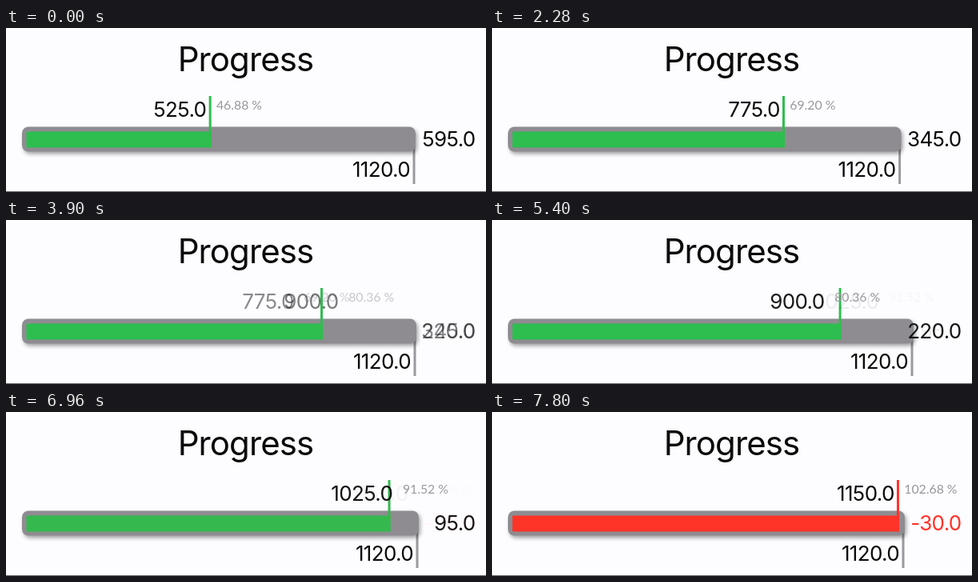
Write an HTML page that moves like this. It is 600x205 px and loops after 7.86 s.

```html
<!DOCTYPE html>
<html lang="en">
<head>
<meta charset="utf-8">
<title>Progress</title>
<style>
  html, body { margin: 0; width: 100%; height: 100%; overflow: hidden; background: #fdfcff; }
  svg { display: block; width: 600px; height: 205px; }
  text { font-family: Inter, "Liberation Sans", sans-serif; font-size: 26px; letter-spacing: -.65px; fill: #0a0a0a; }
  .title { font-size: 42px; letter-spacing: -.9px; text-anchor: middle; }
  .end { text-anchor: end; }
  .percent { font-family: Lato, sans-serif; font-size: 15.8px; letter-spacing: 0; fill: #98979c; }
  .track { fill: #8e8c91; filter: drop-shadow(2px 3px 2.5px rgba(0, 0, 0, .36)); }
  .limit { fill: #9a999d; }
</style>
</head>
<body>
<svg viewBox="0 0 600 205">
  <rect y="204" width="600" height="1" fill="#68676a"/>
  <text class="title" x="299.5" y="54">Progress</text>
  <rect id="limit" class="limit" y="140" width="3" height="55"/>
  <rect id="track" class="track" x="20" y="123.5" height="31" rx="8"/>
  <rect id="bar" x="25.5" y="129.5" height="20" rx="1"/>
  <rect id="marker" y="85" width="3" height="64.5"/>
  <text id="total" class="end" y="186">1120.0</text>
  <g id="labels"></g>
</svg>
<script>
const LOOP = 7860, FADE = 350, TOTAL = 1120, LEFT = 25;
const GREEN = [46, 190, 79], RED = [255, 52, 41];

// start of the change, value, x of the limit line
const states = [
  [-FADE, 525, 510],
  [420, 650, 511],
  [1740, 775, 509.6],
  [3720, 900, 511],
  [5340, 1025, 525],
  [6915, 1150, 514]
].map(([start, value, limit]) => ({
  start, value, limit,
  part: Math.min(value / TOTAL, .9747),
  color: value > TOTAL ? RED : GREEN
}));

const el = id => document.getElementById(id);
const mix = (a, b, k) => a + (b - a) * k;
const rgb = c => `rgb(${c.map(Math.round)})`;
const markerX = (part, limit) => LEFT + part * (limit - 19);

function set(node, attrs) {
  for (const key in attrs) node.setAttribute(key, attrs[key]);
}

function addText(group, text, attrs) {
  const node = document.createElementNS(group.namespaceURI, "text");
  node.textContent = text;
  set(node, attrs);
  group.append(node);
  return node;
}

for (const s of states) {
  const x = markerX(s.part, s.limit), rest = TOTAL - s.value;
  s.group = document.createElementNS(el("labels").namespaceURI, "g");
  el("labels").append(s.group);
  addText(s.group, s.value.toFixed(1), { class: "end", x: x - 4.8, y: 111 });
  addText(s.group, (s.value / TOTAL * 100).toFixed(2) + " %", { class: "percent", x: x + 7.8, y: 102 });
  const label = addText(s.group, rest.toFixed(1), { class: "end", x: 586.6, y: 148 });
  if (rest < 0) label.style.fill = rgb(RED);
}

// cubic-bezier(.42, 0, .58, 1)
function ease(x) {
  let lo = 0, hi = 1;
  for (let i = 0; i < 24; i++) {
    const s = (lo + hi) / 2, r = 1 - s;
    if (3 * r * s * (r * .42 + s * .58) + s ** 3 < x) lo = s; else hi = s;
  }
  return lo * lo * (3 - 2 * lo);
}

function draw(time) {
  const t = time % LOOP;
  const i = states.findLastIndex(s => t >= s.start);
  const now = states[i], old = states[Math.max(i - 1, 0)];
  const k = ease(Math.min((t - now.start) / FADE, 1));
  const x = markerX(mix(old.part, now.part, k), now.limit);
  const fill = rgb(old.color.map((c, n) => mix(c, now.color[n], k)));

  set(el("track"), { width: now.limit - 18 });
  set(el("limit"), { x: now.limit - 1.5 });
  set(el("total"), { x: now.limit - 5 });
  set(el("bar"), { width: x + 1.5 - 25.5, fill });
  set(el("marker"), { x: x - 1.5, fill });
  for (const s of states) {
    s.group.style.opacity = s === now ? k : s === old ? 1 - k : 0;
  }
}

const begin = performance.now();
function tick() {
  draw(performance.now() - begin);
  requestAnimationFrame(tick);
}
tick();
</script>
</body>
</html>
```
